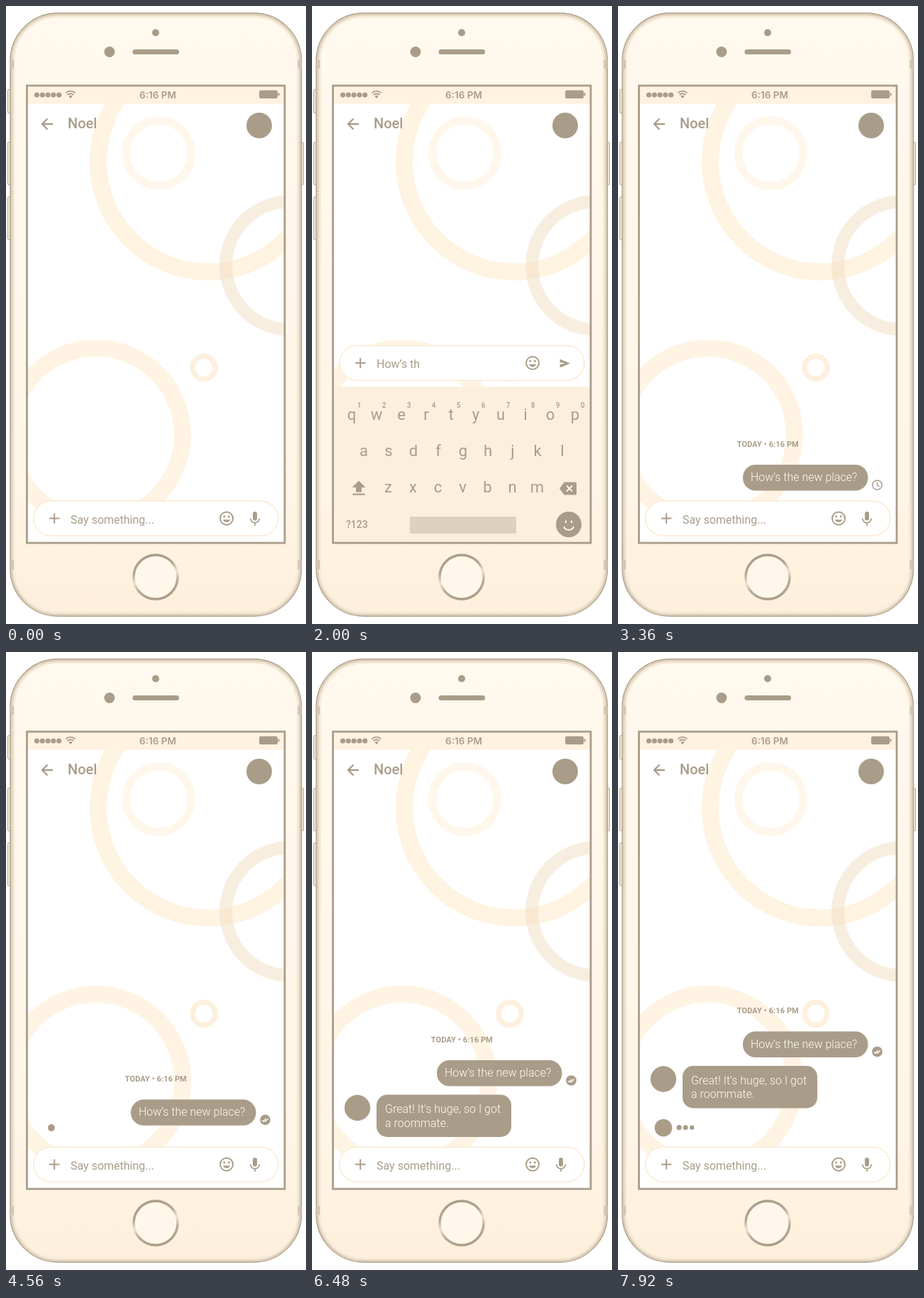
Write an HTML page that moves like this. It is 423 by 869 pixels and loops after 8 s.

```html
<!DOCTYPE html>
<html lang="en">
<head>
<meta charset="utf-8">
<title>Chat on a phone</title>
<style>
html, body { margin: 0; width: 100%; height: 100%; overflow: hidden; background: #fff; }
svg { display: block; width: 423px; height: 869px; font-family: Roboto, sans-serif; }
.dark, text { fill: #a99d89; }
.line { fill: none; stroke: #a99d89; }
.light { fill: none; stroke: #fffaf0; }
.ring { fill: none; }
.msg { font-size: 16px; }
.bubble text { fill: #fffaf0; font-weight: 300; font-size: 16px; }
#keys text { font-size: 22px; text-anchor: middle; }
#keys .num { font-size: 10px; font-weight: 500; }
</style>
</head>
<body>
<svg viewBox="0 0 423 869">
  <defs>
    <linearGradient id="body" x2="0" y2="1">
      <stop offset="0" stop-color="#fff9ee"/><stop offset=".8" stop-color="#fff5e6"/><stop offset="1" stop-color="#fdefdb"/>
    </linearGradient>
    <linearGradient id="home" x1=".35" x2=".65" y2="1">
      <stop offset="0" stop-color="#a99d89"/><stop offset=".3" stop-color="#b3a691"/><stop offset=".5" stop-color="#f0e4d2"/>
      <stop offset=".7" stop-color="#b9ac97"/><stop offset="1" stop-color="#a99d89"/>
    </linearGradient>
    <clipPath id="screen"><rect x="30" y="113" width="362" height="641"/></clipPath>
  </defs>

  <!-- phone -->
  <g fill="#f6ead7" stroke="#b5a893">
    <rect x="2.5" y="117.5" width="6" height="33" rx="1.5"/>
    <rect x="2.5" y="191.5" width="6" height="60" rx="1.5"/>
    <rect x="2.5" y="268.5" width="6" height="60" rx="1.5"/>
    <rect x="413.5" y="191.5" width="6" height="60" rx="1.5"/>
  </g>
  <rect x="6" y="10" width="410.5" height="848" rx="67" fill="url(#body)"/>
  <g fill="none">
    <rect x="10.5" y="14.5" width="401.5" height="839" rx="62" stroke="#f5ead8" stroke-width="4"/>
    <rect x="8" y="12" width="406.5" height="844" rx="65" stroke="#dfd1bb" stroke-width="3"/>
    <rect x="6" y="10" width="410.5" height="848" rx="67" stroke="#ada08b" stroke-width="1.4"/>
    <path d="M8.500 76v12M414 76v12M8.500 779v13M414 779v13" stroke="#d3c5af" stroke-width="5"/>
  </g>
  <circle class="dark" cx="211" cy="37.500" r="5"/>
  <circle class="dark" cx="146" cy="64.500" r="7.500"/>
  <rect class="dark" x="178.500" y="61" width="65.500" height="7" rx="3.500"/>
  <circle cx="211" cy="803" r="31" fill="#fff7ea" stroke="url(#home)" stroke-width="3.500"/>

  <g clip-path="url(#screen)">
    <path fill="#fff" d="M30 113h362v641H30z"/>
    <g class="ring">
      <circle cx="285" cy="219" r="155" stroke="#fff3e1" stroke-width="24"/>
      <circle cx="215.500" cy="207" r="46" stroke="#fff7eb" stroke-width="11.500"/>
      <circle cx="400" cy="365" r="90" stroke="#f3e0c6" stroke-opacity=".55" stroke-width="18"/>
      <circle cx="127" cy="603" r="122" stroke="#fff4e4" stroke-width="24"/>
      <circle cx="279" cy="508.500" r="16" stroke="#fdf0de" stroke-width="7.500"/>
    </g>

    <!-- status bar and header -->
    <path fill="#fff2e0" d="M30 113h362v24.500H30z"/>
    <g class="dark">
      <circle cx="43.500" cy="125" r="3.600"/><circle cx="51.300" cy="125" r="3.600"/><circle cx="59.100" cy="125" r="3.600"/>
      <circle cx="66.900" cy="125" r="3.600"/><circle cx="74.700" cy="125" r="3.600"/>
      <rect x="357" y="118.500" width="26" height="11.500" rx="2.500"/><rect x="383.500" y="122" width="2" height="4.500" rx="1"/>
      <path d="M91 130l-2.500-3a3.600 3.600 0 0 1 5 0z"/>
    </g>
    <path class="line" stroke-width="1.900" d="M84.500 122.300a9.200 9.200 0 0 1 13 0M86.800 125a6 6 0 0 1 8.400 0"/>
    <text x="214" y="129.500" text-anchor="middle" font-family="Inter, sans-serif" font-size="13.500" font-weight="600">6:16 PM</text>
    <path class="line" stroke-width="2.300" d="M66 166H51.500M58.500 158.500L51 166l7.500 7.500"/>
    <text x="87" y="172" font-size="20" font-weight="500">Noel</text>
    <circle class="dark" cx="357" cy="168" r="18"/>

    <!-- conversation -->
    <g id="list">
      <text x="211.300" y="619.800" text-anchor="middle" font-size="11" font-weight="700" letter-spacing=".1">TODAY • 6:16 PM</text>
      <g class="bubble">
        <rect class="dark" x="176" y="645" width="176.500" height="36.500" rx="18"/>
        <text x="187" y="668">How’s the new place?</text>
      </g>
      <g transform="translate(365.500 673.500)">
        <circle id="disc" r="6.600" stroke="#a99d89" stroke-width="1.500"/>
        <path id="mark" fill="none" stroke-width="1.400"/>
      </g>
    </g>
    <g id="typing">
      <circle class="dark" id="small" cx="64" cy="669"/>
      <circle class="dark dot" cx="86.200" cy="668.700"/>
      <circle class="dark dot" cx="95.200" cy="668.700"/>
      <circle class="dark dot" cx="104.200" cy="668.700"/>
    </g>
    <g id="reply" class="bubble">
      <circle class="dark" id="face" cx="64"/>
      <rect class="dark" id="box" x="91" rx="15"/>
      <g id="words">
        <text x="103" y="648">Great! It's huge, so I got</text>
        <text x="103" y="667.500">a roommate.</text>
      </g>
    </g>

    <!-- input and keyboard -->
    <g id="panel">
      <rect x="38.800" y="696" width="345" height="49" rx="24.500" fill="#fff" stroke="#fcead1" stroke-width="1.500"/>
      <path class="line" stroke-width="2" d="M61 720.500h14.500M68.200 713.200v14.500"/>
      <text class="msg" id="field" x="91" y="727.500"></text>
      <g>
        <circle class="line" cx="311" cy="720.500" r="9" stroke-width="2"/>
        <circle class="dark" cx="307.700" cy="717.700" r="1.500"/><circle class="dark" cx="314.300" cy="717.700" r="1.500"/>
        <path class="dark" d="M306 722.300h10a5.300 5.300 0 0 1-10 0z"/>
      </g>
      <g id="mic">
        <rect class="dark" x="348" y="711" width="6" height="12.500" rx="3"/>
        <path class="line" stroke-width="1.800" d="M344.800 720.500a6.200 6.200 0 0 0 12.400 0M351 726.700v4"/>
      </g>
      <path class="dark" id="send" d="M349.500 715L364 721l-14.500 6v-4.500L357 721l-7.500-1.500z"/>
      <path fill="#fcefdd" d="M30 754h362v240H30z"/>
      <g id="keys"></g>
      <path class="dark" d="M66 886l9.500 9.500h-5.500v6.500h-8v-6.500h-5.500zM57.500 904h17v2.200h-17z"/>
      <path class="dark" d="M355.500 888H371a2 2 0 0 1 2 2v14a2 2 0 0 1-2 2h-15.500l-6.500-9z"/>
      <path class="light" stroke-width="1.800" d="M359 893l8 8m0-8l-8 8"/>
      <rect x="138" y="936.500" width="150" height="24" rx="2" fill="#ded2bf"/>
      <text x="48" y="952" font-size="14" font-weight="500">?123</text>
      <circle class="dark" cx="362" cy="947.500" r="18"/>
      <path class="light" stroke-width="2" d="M358 942v3.500M366 942v3.500M355 950.500a7.500 7.500 0 0 0 14 0"/>
    </g>
  </g>
  <rect class="line" x="29.500" y="112" width="363.500" height="643" stroke-width="2.800"/>
</svg>

<script>
const LOOP = 8000, STEP = 80, LIFT = 218.5;
const $ = id => document.getElementById(id);
const set = (el, attrs) => { for (const k in attrs) el.setAttribute(k, attrs[k]); };
const clamp = x => Math.min(1, Math.max(0, x));
const mix = (a, b, p) => a + (b - a) * p;
const ramp = (t, start, len) => clamp((t - start) / len);
const ease = (t, start, len) => 1 - (1 - ramp(t, start, len)) ** 3;
const show = (el, on) => el.style.display = on ? '' : 'none';
const shift = (el, y) => set(el, { transform: `translate(0 ${y})` });

const key = (x, y, s, cls = '') => `<text x="${x}" y="${y}" class="${cls}">${s}</text>`;
$('keys').innerHTML = [['qwertyuiop', 56, 800], ['asdfghjkl', 73, 851], ['zxcvbnm', 107.5, 902.5]]
  .map(([row, x, y], r) => [...row].map((c, i) =>
    key(x + 35 * i, y, c) + (r ? '' : key(x + 10.5 + 35 * i, y - 17, (i + 1) % 10, 'num'))).join('')).join('');

const MESSAGE = 'How’s the new place?';
// [time, letters typed by then]
const TYPED = [[1360, 1], [1440, 2], [1520, 3], [1600, 4], [1680, 5], [1920, 7], [2000, 8], [2080, 9],
  [2240, 11], [2320, 12], [2400, 13], [2480, 16], [2560, 18], [2640, 20]];
const MARKS = {
  clock: 'M0-4V.5L3 2',
  check: 'M-3 .2l2 2L3-2',
  double: 'M-4.500 .5l1.800 1.800L1-1.800M-1 1l1.300 1.300L4.300-2'
};
const dots = document.querySelectorAll('.dot');

function drawPanel(t) {
  shift($('panel'), -LIFT * (ease(t, 740, 470) - ease(t, 3025, 330)));
  const typing = t >= 1360 && t < 3040;
  const count = TYPED.filter(([at]) => t >= at).length;
  $('field').textContent = typing ? MESSAGE.slice(0, TYPED[count - 1][1]) : 'Say something...';
  const send = t >= 1360 && t < 3120;
  show($('send'), send);
  show($('mic'), !send);
}

function drawList(t) {
  const enter = ease(t, 3040, 320);
  const scroll = 40.5 * ease(t, 4500, 400) + 30.5 * ease(t, 6050, 400) + 40.5 * ease(t, 7300, 400);
  shift($('list'), 24 * (1 - enter) - scroll);
  set($('list'), { opacity: t > 3040 ? enter : 0 });

  const read = t >= 4240;
  set($('disc'), { fill: read ? '#a99d89' : '#fff' });
  set($('mark'), {
    d: t < 3600 ? MARKS.clock : t < 3920 ? MARKS.check : MARKS.double,
    stroke: read ? '#fffaf0' : '#a99d89'
  });
}

function drawTyping(t) {
  const u = Math.min(1020, t - (t < 7000 ? 4500 : 7300));
  show($('typing'), u > 0 && (t < 6080 || t > 7300));
  set($('small'), { r: 12.3 * ease(u, 0, 380) });
  dots.forEach((dot, k) => {
    const pulse = 0.4 * Math.sin((u - 1020) / 80 - k * 0.7);
    set(dot, { r: ease(u, 100 + 70 * k, 300) * (3.2 + pulse) });
  });
}

function drawReply(t) {
  const p = ease(t, 6050, 400);
  show($('reply'), p > 0);
  shift($('reply'), -40.5 * ease(t, 7300, 400));
  set($('face'), { cy: mix(669, 641, p), r: mix(12.3, 18.2, p) });
  const h = mix(30, 59.5, p);
  set($('box'), { y: 682 - h, width: mix(30, 190, p), height: h });
  set($('words'), { opacity: ramp(t, 6200, 200) });
}

const start = performance.now();
function frame() {
  const now = (performance.now() - start) % LOOP;
  const t = Math.floor(now / STEP) * STEP;
  drawPanel(t);
  drawList(t);
  drawTyping(t);
  drawReply(t);
  requestAnimationFrame(frame);
}
frame();
</script>
</body>
</html>
```
